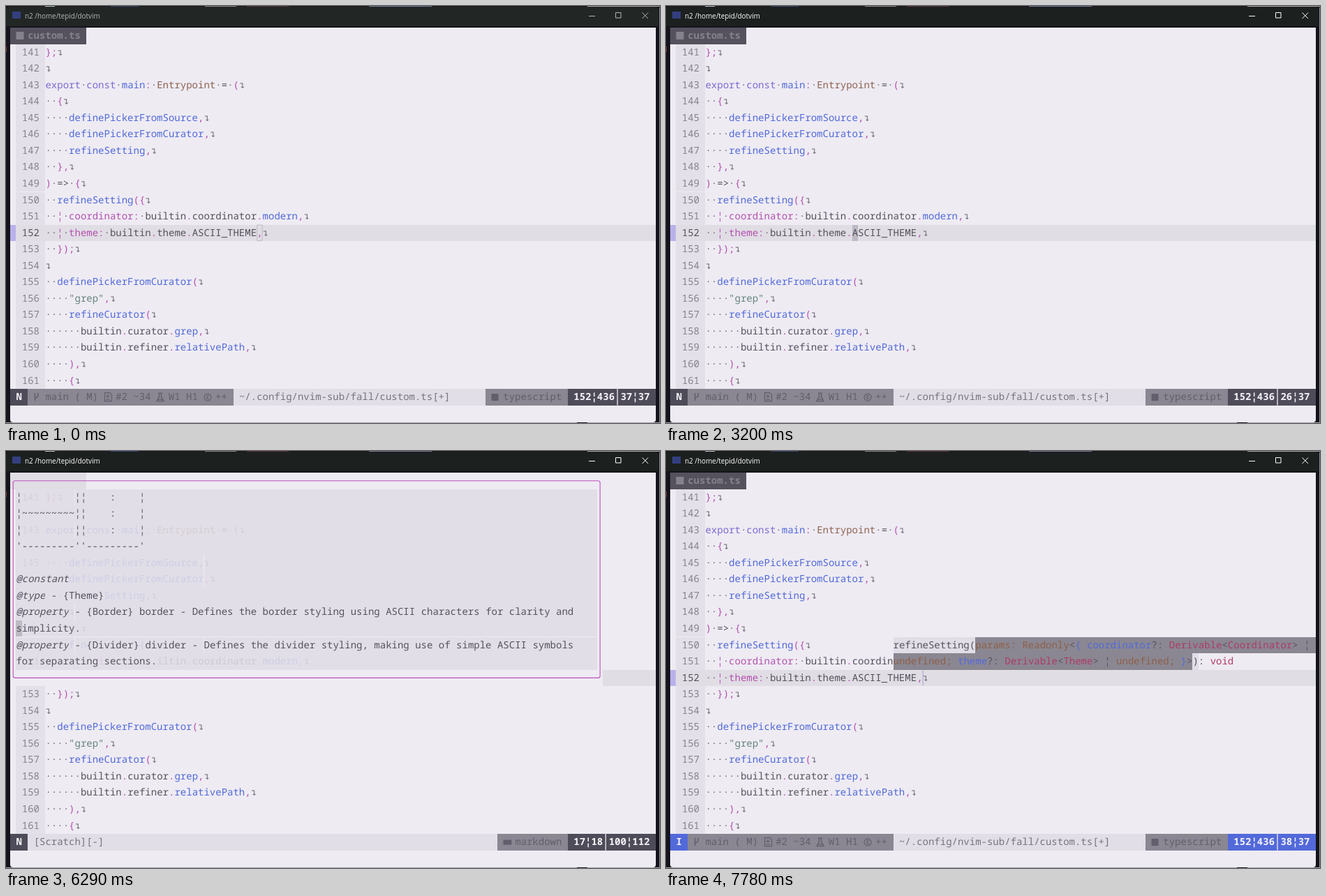
Recreate the animation shown at these times as an HTML page. Size 937 by 598 pixels, loop 8 s.

```html
<!DOCTYPE html>
<html lang="en">
<head>
<meta charset="utf-8">
<title>Editor hover demo</title>
<style>
html, body { margin: 0; width: 100%; height: 100%; overflow: hidden; background: #15141c; }
#stage { position: relative; width: 937px; height: 598px; overflow: hidden; background: #15141c; }
#bar { position: absolute; left: 0; top: 1px; width: 935px; height: 28px; background: #1c201f;
  color: #fff; border-radius: 5px 5px 0 0; }
#bar.away { background: #222726; color: #b4b7b6; }
#bar b { position: absolute; left: 9px; top: 7px; width: 12px; height: 10px; background: #343f80; }
#bar span { position: absolute; left: 27px; top: 4px; font: 9.9px/18px "Open Sans", sans-serif; white-space: pre; }
#bar svg { position: absolute; left: 0; top: -1px; }
#term { position: absolute; left: 6px; top: 31px; width: 925px; height: 566px; overflow: hidden;
  background: #eeebf3; border-radius: 0 0 4px 4px;
  font: 14.015px/23.55px "Noto Sans Mono", "DejaVu Sans Mono", monospace;
  font-variant-ligatures: none; text-rendering: geometricPrecision; }
#term span { position: absolute; height: 23.55px; white-space: pre; }
#term svg { position: absolute; left: 0; top: 0; }
.bold { font-weight: 700; }
.ital { font-style: italic; }
.edge { position: absolute; }
</style>
</head>
<body>
<div id="stage">
  <div id="bar"><b></b><span>n2 /home/tepid/dotvim</span>
    <svg width="935" height="29" fill="none" stroke="currentColor">
      <path d="M835 14.5h9M873.5 9.5h7.5v7.5h-7.5zM911.5 9.5l8.500 8.500M920 9.5l-8.500 8.500"/>
    </svg>
  </div>
  <div id="term"></div>
</div>
<script>
const COLS = 110, ROWS = 24, CW = 925 / COLS, RH = 23.55, LOOP = 8000;
const C = {
  base: '#eeebf3', text: '#55525f', num: '#86828f', dot: '#756d80', eol: '#77727f',
  punct: '#b450ae', blue: '#5069d8', key: '#7d69d2', type: '#8d6250', str: '#66837f',
  gutter: '#e3e0e9', line: '#e0dde4', sign: '#b9b1ea', float: '#e1dee7', cursor: '#bdbac4',
  tab: '#55525e', tabText: '#85818d', mid: '#8a8792', midText: '#625e6b', path: '#77737f',
  dark: '#4f4c59', ins: '#5269da', white: '#f4f1f8', border: '#bd50bd', code: '#6d7da2',
  brown: '#8f5f47', red: '#ad3a66'
};

const CODE = [
  '};', '', 'export·const·main:·Entrypoint·=·(', '··{',
  '····definePickerFromSource,', '····definePickerFromCurator,', '····refineSetting,',
  '··},', ')·=>·{', '··refineSetting({',
  '··¦·coordinator:·builtin.coordinator.modern,', '··¦·theme:·builtin.theme.ASCII_THEME,',
  '··});', '', '··definePickerFromCurator(', '····"grep",', '····refineCurator(',
  '······builtin.curator.grep,', '······builtin.refiner.relativePath,', '····),', '····{'
];

// A line break marks where a long line wraps.
const DOC = [
  'const ASCII_THEME: Theme', 'ASCII Theme.',
  'This theme uses only ASCII characters for borders and dividers, making it ideal for',
  'terminals that lack support for box-drawing characters. The theme uses basic ASCII characters',
  "like `.`, `-`, `¦`, `'`, and `~` to create simple and readable boundaries. It's a minimalistic",
  'design that focuses on legibility while ensuring compatibility with basic terminals.',
  'Visual Representation:', '',
  '.---------..---------.', '¦         ¦¦    :    ¦', '¦~~~~~~~~~¦¦    :    ¦',
  '¦         ¦¦    :    ¦', "'---------''---------'", '',
  '_@constant_', '_@type_ - {Theme}',
  '_@property_ - {Border} border - Defines the border styling using ASCII characters for clarity and\nsimplicity.',
  '_@property_ - {Divider} divider - Defines the divider styling, making use of simple ASCII symbols\nfor separating sections.'
];
const docRows = DOC.flatMap((s, n) => s.split('\n').map((text, k) => ({
  text, line: n + 1, col: k ? 100 : 1, len: s.length + (s.includes('\n') ? 3 : 0)
})));

const steps = [
  [0, { focus: 0, mode: 'N', col: 37, sig: 0, hover: 0, at: -1, cmd: '' }],
  [720, { focus: 1 }],
  [2240, { mode: 'I', col: 38, sig: 1 }],
  [2850, { mode: 'N', col: 37, sig: 0 }],
  [3070, { col: 26 }],
  [3470, { hover: 1 }],
  [3930, { cmd: '^W' }],
  [4140, { cmd: '', at: 0 }],
  [4410, { at: 1 }], [4540, { at: 2 }],
  ...[3, 5, 7, 9, 11, 13, 15, 17, 18].map((at, i) => [4940 + 70 * i, { at }]),
  [5630, { at: 19 }], [5830, { at: 18 }],
  ...[17, 15, 13, 11, 9, 7, 5].map((at, i) => [6290 + 70 * i, { at }]),
  [6790, { at: 3 }], [6840, { at: 2 }], [6910, { at: 1 }], [6980, { at: 0 }],
  [7180, { hover: 0, at: -1 }],
  [7710, { mode: 'I', col: 38 }],
  [7780, { sig: 1 }]
];

// Merge the steps into full states; the hover window scrolls to keep its cursor visible.
let last = { top: 0 };
const states = steps.map(([time, change]) => {
  const s = { ...last, ...change, time };
  if (s.at >= 0) {
    const end = s.at === 18 ? 19 : s.at;
    s.top = Math.min(Math.max(s.top, end - 10), s.at);
  }
  return last = s;
});

let cells, shapes;
const fill = (r, c0, c1, bg) => { for (let c = c0; c < c1; c++) cells[r][c].bg = bg; };
function put(r, c, str, fg, bg, font = '') {
  for (const ch of str) {
    if (c >= COLS) break;
    const cell = cells[r][c++];
    Object.assign(cell, { ch, fg, font });
    if (bg) cell.bg = bg;
  }
  return c;
}
const rect = (x, y, w, h, color) =>
  shapes += `<rect x="${x}" y="${y}" width="${w}" height="${h}" fill="${color}"/>`;
const stroke = (d, color, w = 1.2) =>
  shapes += `<path d="${d}" fill="none" stroke="${color}" stroke-width="${w}"/>`;
function mix(a, b, k) {
  const part = (s, i) => parseInt(s.slice(i, i + 2), 16);
  return '#' + [1, 3, 5].map(i =>
    Math.round(part(a, i) * (1 - k) + part(b, i) * k).toString(16).padStart(2, '0')).join('');
}

const BLUE = /^(main|define\w+|refine[SC]\w+|modern|grep|relativePath)$/;
function tokenColor(t) {
  if (t[0] === '"') return C.str;
  if (t[0] === '·') return C.dot;
  if (/^(export|const)$/.test(t)) return C.key;
  if (t === 'Entrypoint') return C.type;
  if (BLUE.test(t)) return C.blue;
  if (/^(coordinator|theme):$/.test(t) || /^[^\w=>]/.test(t)) return C.punct;
  return C.text;
}
function drawCode() {
  CODE.forEach((src, i) => {
    const r = i + 1, here = r === 12;
    fill(r, 1, 6, C.gutter);
    if (here) { fill(r, 1, COLS, C.line); fill(r, 0, 1, C.sign); }
    put(r, 2, String(141 + i), here ? C.text : C.num);
    let c = 6;
    for (const t of src.match(/"\w+"|(coordinator|theme):|\w+|·+|=>|./g) || []) c = put(r, c, t, tokenColor(t));
    put(r, c, '↴', C.eol);
  });
}
function drawTab() {
  put(0, 0, '   custom.ts ', C.tabText, C.tab, 'bold');
  rect(8.5, 6, 11, 11, C.tabText);
}
function drawSignature() {
  const list = (r, c, parts) => parts.forEach(([s, fg, bg = C.mid]) => c = put(r, c, s, fg, bg));
  list(10, 38, [
    ['refineSetting(', C.text, C.float], ['params: Readonly', C.brown], ['<', C.text], ['{ ', C.ins],
    ['coordinator', C.ins], ['?: ', C.text], ['Derivable', C.red], ['<', C.text],
    ['Coordinator', C.red], ['> ¦ ', C.text]
  ]);
  list(11, 38, [
    ['undefined; ', C.brown], ['theme', C.ins], ['?: ', C.text], ['Derivable', C.red], ['<', C.text],
    ['Theme', C.red], ['> ¦ ', C.text], ['undefined; ', C.brown], ['}', C.ins], ['>', C.text],
    [')', C.text, C.float], [': ', C.text, C.base], ['void', C.red, C.base]
  ]);
  put(11, 96, ' '.repeat(14), C.text, C.base);
}

function drawHover(s) {
  put(0, 0, ' '.repeat(COLS), C.text);
  fill(0, 0, 13, C.line);
  put(12, 0, ' '.repeat(101), C.text, C.base);
  for (let r = 1; r <= 11; r++) {
    fill(r, 0, 101, C.base);
    // Blank cells let the code below shine through.
    for (let c = 1; c < 100; c++) {
      const cell = cells[r][c];
      cell.fg = mix(cell.fg, C.float, 0.86);
      cell.bg = C.float;
    }
    cells[r][0].ch = cells[r][100].ch = ' ';
    let c = 1;
    for (const part of docRows[s.top + r - 1].text.split(/(`.`|_@\w+_)/)) {
      const mark = /^(`.`|_@)/.test(part);
      for (const ch of mark ? part.slice(1, -1) : part) {
        if (ch !== ' ') put(r, c, ch, mark && part[0] === '`' ? C.code : C.text, '', mark && part[0] === '_' ? 'ital' : '');
        c++;
      }
    }
  }
  const x = CW / 2, y = RH / 2;
  shapes += `<rect x="${x}" y="${y}" width="${100 * CW}" height="${12 * RH}" rx="3" fill="none" stroke="${C.border}" stroke-width="1.1"/>`;
  if (s.at >= 0) fill(1 + s.at - s.top, 1, 2, C.cursor);
  else fill(12, s.col + 5, s.col + 6, C.cursor);
}

function drawStatus(s) {
  const r = 22, y = r * RH, accent = s.mode === 'I' ? C.ins : C.dark;
  const scratch = s.at >= 0, doc = docRows[s.at];
  fill(r, 0, COLS, C.float);
  put(r, 0, ` ${s.mode} `, C.white, accent, 'bold');
  if (scratch) put(r, 4, '[Scratch][-]', C.path);
  else {
    put(r, 3, '   main ( M)   #2 ~34   W1 H1   ++ ', C.midText, C.mid);
    put(r, 39, '~/.config/nvim-sub/fall/custom.ts[+]', C.path);
    stroke(`M35.500 ${y + 6}v11M40 ${y + 6}v3q0 3-4.500 4`, C.midText, 1.5);
    stroke(`M135.500 ${y + 5.5}h7l3 3v9h-10zM140 ${y + 8}v5M137.500 ${y + 10.5}h5M137.500 ${y + 15}h5`, C.midText);
    stroke(`M212 ${y + 6}h6M213.500 ${y + 6}v5l-3.500 6.500h10l-3.500-6.500v-5M212 ${y + 15}h6`, C.midText, 1.4);
    stroke(`M278 ${y + 12}a5 5 0 1 0 10 0a5 5 0 1 0-10 0M285 ${y + 10}h-3v4h3`, C.midText);
  }
  const name = `   ${scratch ? 'markdown' : 'typescript'} `;
  const line = scratch ? ` ${doc.line}¦18` : ' 152¦436';
  const col = scratch
    ? `${String(doc.col).padStart(2)}¦${String(doc.len).padStart(2)}` : `${s.col}¦37`;
  const tail = `${line} ${col} `;
  let c = COLS - name.length - tail.length;
  const x = (c + 1) * CW;
  scratch ? rect(x, y + 8.5, 12, 7, C.midText) : rect(x, y + 7, 10, 10, C.midText);
  c = put(r, c, name, C.midText, C.mid);
  put(r, c, tail, C.white, accent, 'bold');
  rect((c + line.length) * CW + 3.2, y, 1.4, RH, C.float);
  put(23, 99, s.cmd, C.text);
}

function drawCursor(s) {
  const c = s.col + 5, x = c * CW, y = 12 * RH;
  if (s.mode === 'I') rect(x, y + 1, 1.2, RH - 2, '#b5b0d6');
  else if (s.focus) fill(12, c, c + 1, C.cursor);
  else stroke(`M${x + .5} ${y + .5}h${CW - 1}v${RH - 1}h${1 - CW}z`, C.cursor, 1);
}

const esc = s => s.replace(/&/g, '&amp;').replace(/</g, '&lt;');
function rowHtml(row, r) {
  let out = '';
  for (let c = 0; c < COLS;) {
    const { fg, bg, font } = row[c], from = c;
    let str = '';
    while (c < COLS && row[c].fg === fg && row[c].bg === bg && row[c].font === font) str += row[c++].ch;
    if (!bg && !str.trim()) continue;
    out += `<span class="${font}" style="left:${(from * CW).toFixed(2)}px;top:${(r * RH).toFixed(2)}px;` +
      `width:${((c - from) * CW).toFixed(2)}px;color:${fg};background:${bg || 'none'}">${esc(str)}</span>`;
  }
  return out;
}

const term = document.getElementById('term'), bar = document.getElementById('bar');
function render(s) {
  cells = Array.from({ length: ROWS }, () =>
    Array.from({ length: COLS }, () => ({ ch: ' ', fg: C.text, bg: '', font: '' })));
  shapes = '';
  drawCode();
  if (s.hover) drawHover(s);
  else { drawTab(); drawCursor(s); }
  if (s.sig) drawSignature();
  drawStatus(s);
  term.innerHTML = cells.map(rowHtml).join('') + `<svg width="925" height="566">${shapes}</svg>`;
  bar.className = s.focus ? '' : 'away';
}

// Slivers of the desktop around the window.
[[56, 0, 14, 1, '#b9b9c4'], [150, 0, 40, 1, '#39406b'], [285, 0, 45, 1, '#8a7f86'],
 [345, 0, 60, 1, '#5a3040'], [520, 0, 90, 1, '#77749a'], [833, 0, 104, 1, '#a9a9ad'],
 [0, 597, 818, 1, '#a5a3aa'], [833, 597, 104, 1, '#a5a3aa'], [936, 2, 1, 595, '#8f8e94'],
 [0, 58, 1, 8, '#7a3434']].forEach(([x, y, w, h, color]) => {
  const d = document.createElement('div');
  d.className = 'edge';
  d.style.cssText = `left:${x}px;top:${y}px;width:${w}px;height:${h}px;background:${color}`;
  document.getElementById('stage').append(d);
});

let shown = null;
const start = performance.now();
function tick(now) {
  const t = Math.max(0, now - start) % LOOP;
  const s = states.findLast(v => v.time <= t);
  if (s !== shown) render(shown = s);
  requestAnimationFrame(tick);
}
tick(start);
</script>
</body>
</html>
```
